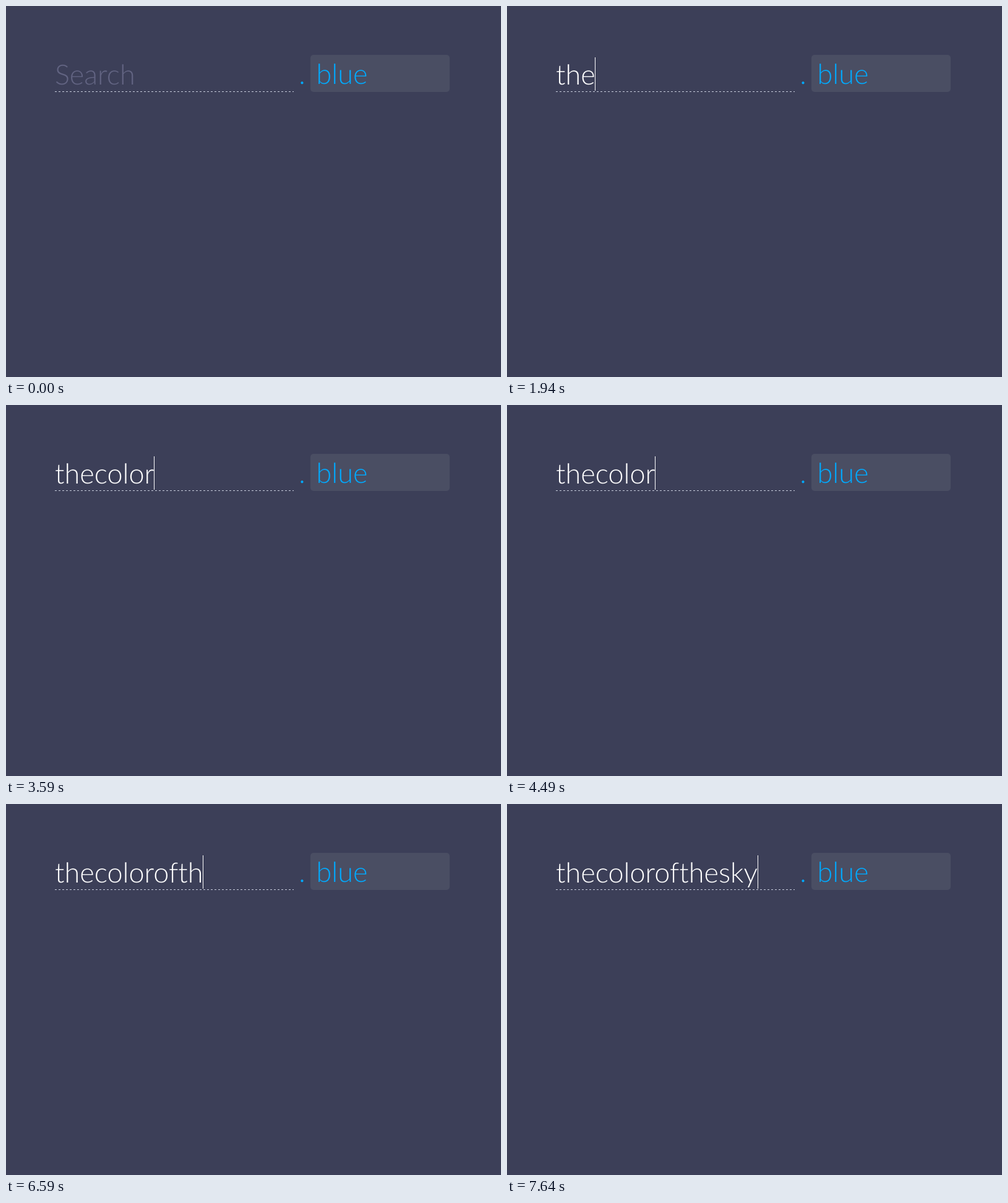
These frames come from a looping animation (800x600 px, 8 s). An HTML page:

```html
<!DOCTYPE html>
<html lang="en">
<head>
<meta charset="utf-8">
<title>Search field typing</title>
<style>
  html, body { margin: 0; width: 100%; height: 100%; overflow: hidden; background: #3c3f58; }
  div {
    position: absolute; box-sizing: border-box; white-space: pre;
    font: 300 45px/54px Lato, sans-serif;
    font-variant-ligatures: none; text-rendering: geometricPrecision;
  }
  #field { left: 79px; top: 83px; color: #fff; }
  #field.empty { color: #626482; }
  #line {
    left: 79px; top: 138px; width: 386px; height: 1px;
    background: repeating-linear-gradient(90deg, #c8cddd 0 3px, transparent 3px 6px);
  }
  #caret { top: 83px; width: 1px; height: 54px; background: #fff; }
  #dot, #ending { color: #0af; }
  #dot { left: 465px; top: 82px; width: 27px; text-align: center; }
  #ending { left: 492px; top: 79px; width: 225px; height: 60px; padding: 3px 9.5px; border-radius: 5px; background: #4a4e63; }
</style>
</head>
<body>
<div id="field"></div>
<div id="line"></div>
<div id="caret"></div>
<div id="dot">.</div>
<div id="ending">blue</div>
<script>
  const duration = 8000, tick = 150, blink = 500, fieldLeft = 79;
  // Each word: letters, start time and pace in ms; typing slows towards its end
  const words = [['the', 1500, 172], ['color', 2610, 142], ['of', 5220, 142], ['the', 6455, 140], ['sky', 7260, 142]];
  const keys = words.flatMap(([word, start, pace]) =>
    [...word].map((letter, i) => ({ letter, time: start + pace * i ** 1.3 })));

  const field = document.getElementById('field');
  const caret = document.getElementById('caret');

  function draw() {
    // The picture advances in even ticks
    const now = Math.floor((performance.now() % duration + 10) / tick) * tick;
    const typed = keys.filter(key => key.time <= now);
    field.textContent = typed.map(key => key.letter).join('') || 'Search';
    field.className = typed.length ? '' : 'empty';

    // The blink restarts at every key
    const blinkStart = typed.length ? typed.at(-1).time : -650;
    caret.hidden = Math.floor((now - blinkStart) / blink) % 2 === 1;
    const width = typed.length ? field.getBoundingClientRect().width : 0;
    caret.style.left = Math.floor(fieldLeft + width) + 'px';
    requestAnimationFrame(draw);
  }
  draw();
</script>
</body>
</html>
```
